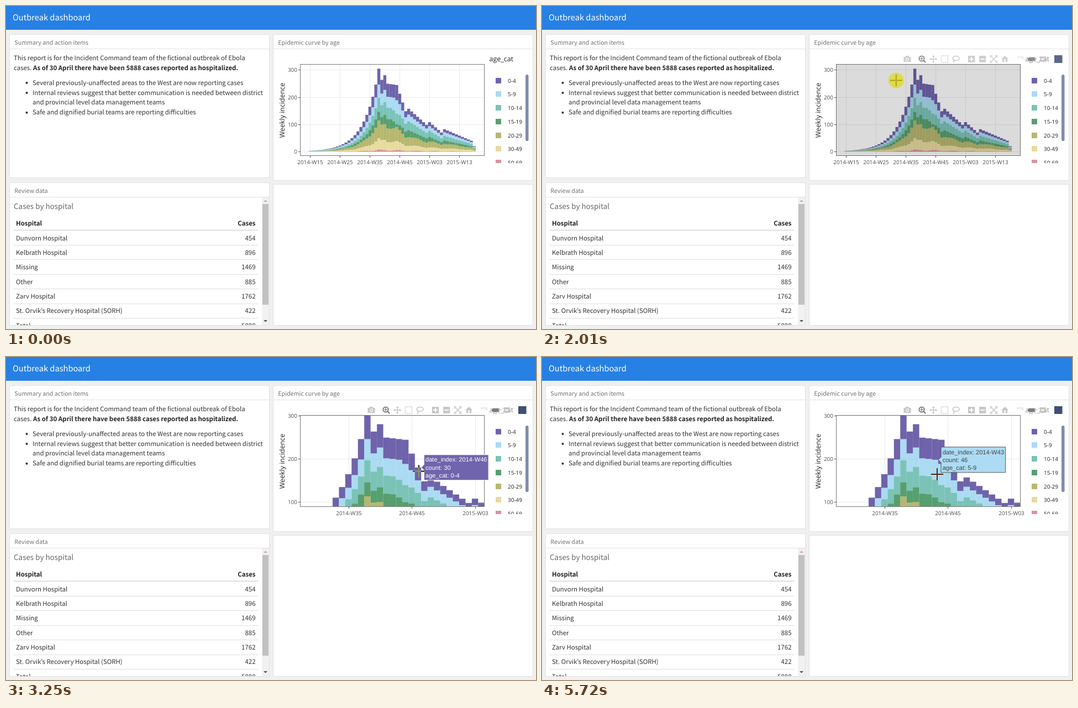
These frames come from a looping animation (959 by 584 pixels, 6960 ms). An HTML page with a canvas:

```html
<!DOCTYPE html>
<html lang="en">
<head>
<meta charset="utf-8">
<title>Outbreak dashboard</title>
<style>
html, body { margin: 0; width: 100%; height: 100%; overflow: hidden; background: #f0f0f0; }
canvas { display: block; width: 959px; height: 584px; }
</style>
</head>
<body>
<canvas id="stage" width="959" height="584"></canvas>
<script>
const ctx = document.getElementById('stage').getContext('2d');
const LOOP = 6960, ENTER = 310, PRESS = 2010, RELEASE = 2940, ZOOM = 3010;
const UI = '"Noto Sans CJK JP", "Noto Sans CJK SC", "Noto Sans CJK", "Open Sans", sans-serif';
const PLOT = '"Open Sans", "Noto Sans", sans-serif';
const TIP = '"Liberation Sans", Arial, sans-serif';
const BODY = 11.44;
const BOX = { x: 532.5, y: 105.5, w: 333, h: 165 };

const clamp = v => Math.max(0, Math.min(1, v));
const lerp = (a, b, u) => a + (b - a) * u;

// Weekly cases: exponential growth up to the peak, then a decline through key points
const FIRST = 15, PEAK = 38, LAST = 70;
const decline = [[PEAK, 304], [39, 263], [40, 280], [41, 249], [44, 244], [47, 148], [48, 157],
  [54, 98], [55, 108], [59, 70], [60, 82], [69, 40], [LAST, 20]];

function cases(week) {
  if (week < PEAK) return 300 * Math.exp(0.2 * (week - PEAK));
  const n = Math.max(1, decline.findIndex(p => p[0] >= week));
  const [a, b] = [decline[n - 1], decline[n]];
  return lerp(a[1], b[1], (week - a[0]) / (b[0] - a[0]));
}

// Each band: share of cases in it and all older bands, late shift, dip around week 44
const bands = [
  { age: '0-4', rgb: [51, 34, 136], share: 1 },
  { age: '5-9', rgb: [136, 204, 238], share: 0.807, late: 0.055, dip: 0.037, narrow: 3 },
  { age: '10-14', rgb: [68, 170, 153], share: 0.648, late: 0.06, dip: 0.076, narrow: 0.9 },
  { age: '15-19', rgb: [17, 119, 51], share: 0.48, late: 0.02, dip: 0.07, narrow: 0.9 },
  { age: '20-29', rgb: [153, 153, 51], share: 0.355, noise: 0.06 },
  { age: '30-49', rgb: [221, 204, 119], share: 0.15, noise: 0.1 },
  { age: '50-69', rgb: [204, 102, 119], share: 0.02, noise: 0.4 },
  { age: '70+', rgb: [136, 34, 85], share: 0.005 }
];
for (const b of bands) {
  b.fill = `rgba(${b.rgb},0.7)`;
  b.solid = `rgb(${b.rgb.map(n => Math.round(n * 0.7 + 76.5))})`;
}

function edge(week, { share, late = 0, dip = 0, narrow = 1, noise = 0 }) {
  const s = share + late * clamp((week - 44) / 4) - dip * Math.exp(-narrow * (week - 44) ** 2);
  return cases(week) * s * (1 + noise * Math.sin(week * 7.3));
}

const bars = Array.from({ length: LAST - FIRST + 1 }, (_, n) => {
  const week = FIRST + n;
  return { week, tops: [...bands.map(b => edge(week, b)), 0] };
});

const views = {
  full: { x: w => 550.4 + (w - 15) * 5.4, y: v => 263.3 - v * 0.4935, step: 5.4, firstWeek: 15, low: 0 },
  zoom: { x: w => 619.6 + (w - 35) * 11.45, y: v => 105.8 + (300 - v) * 0.783, step: 11.45, firstWeek: 35, low: 100 }
};
const weekName = w => w > 52 ? '2015-W' + String(w - 52).padStart(2, '0') : '2014-W' + w;

// Pointer strokes: start, end, and where they lead; advanced in steps of about 75 ms
const STEP = 75, ORIGIN = [775, 262];
const strokes = [
  [ENTER, 920, 712, 181], [1230, 1390, 696, 143], [1469, 1860, 617, 115],
  [PRESS, 2235, 712, 193], [2311, 2690, 775, 218], [RELEASE, 3630, 719, 195],
  [3720, 3790, 717, 225], [3860, 3860, 716, 184], [4570, 4570, 716, 185.5],
  [4640, 4870, 713, 232], [5040, 5040, 713, 236], [5490, 5720, 715, 212]
];

// Position now, position one step before, and the time of the current step
function pointer(t) {
  let at = ORIGIN, last = ORIGIN, time = 0;
  for (const [a, b, x, y] of strokes) {
    if (t < a - 8) break;
    const steps = Math.round((b - a) / STEP) + 1;
    const dt = (b - a) / (steps - 1) || 1;
    const k = Math.min(steps, Math.floor((t - a + 8) / dt) + 1);
    const from = at;
    const spot = n => [lerp(from[0], x, n / steps), lerp(from[1], y, n / steps)];
    last = spot(k - 1);
    at = spot(k);
    time = a + (k - 1) * dt;
  }
  if (t > time + 80) last = at;
  return { at, last, time };
}

function rect(x, y, w, h, fill) {
  ctx.fillStyle = fill;
  ctx.fillRect(x, y, w, h);
}

function text(s, x, y, size, { font = UI, weight = 400, fill = '#333', align = 'left' } = {}) {
  ctx.font = `${weight} ${size}px ${font}`;
  ctx.textAlign = align;
  ctx.fillStyle = fill;
  ctx.fillText(s, x, y);
  return ctx.measureText(s).width;
}

function stroke(color, width, ...lines) {
  ctx.strokeStyle = color;
  ctx.lineWidth = width;
  ctx.beginPath();
  for (const [x, y, ...rest] of lines) {
    ctx.moveTo(x, y);
    for (let n = 0; n < rest.length; n += 2) ctx.lineTo(rest[n], rest[n + 1]);
  }
  ctx.stroke();
}

function poly(points, fill) {
  ctx.fillStyle = fill;
  ctx.beginPath();
  for (let n = 0; n < points.length; n += 2) ctx.lineTo(points[n], points[n + 1]);
  ctx.closePath();
  ctx.fill();
}

function outline(color, width) {
  ctx.strokeStyle = color;
  ctx.lineWidth = width;
  ctx.stroke();
}

function oval(x, y, rx, ry = rx) {
  ctx.beginPath();
  ctx.ellipse(x, y, rx, ry, 0, 0, 7);
}

function disc(x, y, r, fill) {
  ctx.fillStyle = fill;
  oval(x, y, r);
  ctx.fill();
}

function clipped(x, y, w, h, draw) {
  ctx.save();
  ctx.beginPath();
  ctx.rect(x, y, w, h);
  ctx.clip();
  draw();
  ctx.restore();
}

function card(x, y, w, h, title) {
  rect(x, y, w, h, '#fff');
  ctx.strokeStyle = '#e2e2e2';
  ctx.lineWidth = 1;
  ctx.strokeRect(x + 0.5, y + 0.5, w - 1, h - 1);
  if (!title) return;
  rect(x, y + 26, w, 1, '#e2e2e2');
  text(title, x + 9.3, y + 19, 10.68, { fill: '#707070' });
}

function summary() {
  text('This report is for the Incident Command team of the fictional outbreak of Ebola', 14, 97.6, BODY);
  const w = text('cases. ', 14, 115.6, BODY);
  text('As of 30 April there have been 5888 cases reported as hospitalized.', 14 + w, 115.6, BODY,
    { weight: 700, fill: '#222' });
  ['Several previously-unaffected areas to the West are now reporting cases',
    'Internal reviews suggest that better communication is needed between district',
    'and provincial level data management teams',
    'Safe and dignified burial teams are reporting difficulties'].forEach((s, n) => {
    const y = 142.6 + n * 17.9;
    text(s, 48, y, BODY);
    if (n !== 2) disc(37.5, y - 3.6, 2, '#333');
  });
}

function table() {
  text('Cases by hospital', 14, 367, 13.45, { weight: 300, fill: '#666' });
  const row = (a, b, y, opts) => {
    text(a, 18, y, BODY, opts);
    text(b, 451.5, y, BODY, { ...opts, align: 'right' });
  };
  row('Hospital', 'Cases', 396.6, { weight: 700, fill: '#222' });
  rect(14, 404.5, 442, 1.6, '#d8d8d8');
  Object.entries({
    'Dunvorn Hospital': 454, 'Kelbrath Hospital': 896, Missing: 1469, Other: 885,
    'Zarv Hospital': 1762, 'St. Orvik’s Recovery Hospital (SORH)': 422, Total: 5888
  }).forEach(([name, count], n) => {
    row(name, count, 423.6 + n * 26.35);
    rect(14, Math.round(432 + n * 26.4), 442, 1, '#dedede');
  });
  rect(463, 346, 13, 231, '#f1f1f1');
  rect(464, 358, 11, 182, '#c1c1c1');
  poly([466, 354, 469.5, 350.5, 473, 354], '#d3a5a8');
  poly([466, 568, 473, 568, 469.5, 571.5], '#505050');
}

function dashboard() {
  rect(0, 0, 959, 584, '#f0f0f0');
  rect(0, 0, 959, 43, '#2780e3');
  text('Outbreak dashboard', 12, 26.2, 14.65, { fill: '#fff' });
  card(6, 51, 471, 260, 'Summary and action items');
  card(6, 319, 471, 259, 'Review data');
  card(483, 51, 471, 265, 'Epidemic curve by age');
  card(483, 322, 471, 256);
  summary();
  clipped(7, 346, 469, 231, table);
}

function chart(view) {
  const { x, y, w, h } = BOX;
  const tick = { font: PLOT, fill: '#4d4d4d' };
  for (let v = view.low; v <= 300; v += 100) {
    const py = Math.round(view.y(v)) + 0.5;
    stroke('#ebebeb', 1, [x, py, x + w, py]);
    stroke('#444', 1, [x - 3.5, py, x, py]);
    text(v, 527, py + 3.6, 9.96, { ...tick, align: 'right' });
  }
  for (let v = view.firstWeek; view.x(v) < x + w; v += 10) {
    const px = Math.round(view.x(v)) + 0.5;
    stroke('#ebebeb', 1, [px, y, px, y + h]);
    stroke('#444', 1, [px, y + h, px, y + h + 3.5]);
    text(weekName(v), px, 286.2, 9.96, { ...tick, align: 'center' });
  }
  clipped(x, y, w, h, () => {
    for (const { week, tops } of bars) {
      const left = view.x(week) - view.step / 2;
      bands.forEach((band, k) => {
        const top = view.y(tops[k]);
        rect(left, top, view.step, view.y(tops[k + 1]) - top, band.fill);
      });
    }
  });
  ctx.strokeStyle = '#777';
  ctx.lineWidth = 1;
  ctx.strokeRect(x, y, w, h);
  ctx.save();
  ctx.translate(504, 188.5);
  ctx.rotate(-Math.PI / 2);
  text('Weekly incidence', 0, 0, 12.44, { font: PLOT, fill: '#222', align: 'center' });
  ctx.restore();
}

function legend() {
  text('age_cat', 874.5, 100, 12.44, { font: PLOT, fill: '#222' });
  clipped(870, 105, 84, 179, () => bands.slice(0, 7).forEach((band, k) => {
    const y = 134.7 + k * 24.75;
    rect(886, Math.round(y - 5), 10, 10, band.fill);
    text(band.age, 908, y + 4, 9.96, { font: PLOT, fill: '#222' });
  }));
  ctx.fillStyle = '#808bb0';
  ctx.beginPath();
  ctx.roundRect(940, 124, 5.5, 120, 2.6);
  ctx.fill();
}

// Toolbar icons, each drawn around its own centre
const icons = {
  camera(c) { rect(-6.5, -4, 13, 9, c); rect(-3, -6, 6, 2, c); disc(0, 0.5, 3, '#fff'); disc(0, 0.5, 1.8, c); },
  lens(c) {
    oval(-1, -1, 4.6);
    outline(c, 2);
    stroke(c, 2.2, [2.4, 2.4, 6.3, 6.3]);
    stroke(c, 1.3, [-3.4, -1, 1.4, -1], [-1, -3.4, -1, 1.4]);
  },
  pan(c) {
    stroke(c, 1.4, [-6, 0, 6, 0], [0, -6, 0, 6]);
    for (const s of [-1, 1]) {
      poly([s * 7, 0, s * 4, -2.5, s * 4, 2.5], c);
      poly([0, s * 7, -2.5, s * 4, 2.5, s * 4], c);
    }
  },
  select(c) {
    ctx.setLineDash([2, 1.4]);
    stroke(c, 1.6, [-6, -6, 6, -6, 6, 6, -6, 6, -6, -6]);
    ctx.setLineDash([]);
  },
  lasso(c) {
    oval(0.5, -1.5, 6, 4);
    outline(c, 1.6);
    stroke(c, 1.6, [-4, 1.5, -2.5, 4, -4, 6.5]);
  },
  plus(c) { icons.minus(c); stroke('#fff', 2, [0, -4, 0, 4]); },
  minus(c) { rect(-6, -6, 12, 12, c); stroke('#fff', 2, [-4, 0, 4, 0]); },
  fit(c) {
    stroke(c, 1.5, [-4.5, -4.5, 4.5, 4.5], [-4.5, 4.5, 4.5, -4.5]);
    for (const a of [-1, 1]) for (const b of [-1, 1]) stroke(c, 1.5, [a * 2.5, b * 6, a * 6, b * 6, a * 6, b * 2.5]);
  },
  home(c) { poly([-6.5, 0, 0, -6, 6.5, 0], c); rect(-4.5, 0, 3.3, 5.5, c); rect(1.2, 0, 3.3, 5.5, c); },
  spikes(c) { for (let n = 0; n < 4; n++) rect(-5 + n * 3, -4.5, 1.7, 1.7, c); rect(4, -1.5, 1.7, 1.7, c); },
  tag(c) { poly([-7, 0, -4, -3.3, 6.5, -3.3, 6.5, 3.3, -4, 3.3], c); },
  tags(c) { for (const y of [-3, 3]) poly([-6.5, y, -4, y - 2, 6.5, y - 2, 6.5, y + 2, -4, y + 2], c); }
};
// Icons sit 20 px apart within a group
const groups = [[661, 'camera'], [688, 'lens', 'pan', 'select', 'lasso'],
  [777, 'plus', 'minus', 'fit', 'home'], [865, 'spikes', 'tag', 'tags']];

function toolbar(opacity) {
  if (opacity <= 0) return;
  ctx.save();
  ctx.globalAlpha = opacity;
  rect(653, 88, 291, 16, 'rgba(255,255,255,0.5)');
  for (const [x, ...names] of groups) names.forEach((name, n) => {
    ctx.save();
    ctx.translate(x + n * 20.2, 96);
    icons[name](name === 'lens' || name === 'tag' ? '#7c7c7c' : '#c6c6c6');
    ctx.restore();
  });
  rect(927, 89, 14.5, 14, '#3f4f75');
  ctx.restore();
}

function tooltip(view, [x, y]) {
  const bar = bars.find(b => Math.abs(view.x(b.week) - x) <= view.step / 2);
  if (!bar) return;
  const k = bands.findIndex((_, n) => y >= view.y(bar.tops[n]) && y < view.y(bar.tops[n + 1]));
  if (k < 0) return;
  const lines = ['date_index: ' + weekName(bar.week),
    'count: ' + Math.round(bar.tops[k] - bar.tops[k + 1]), 'age_cat: ' + bands[k].age];
  ctx.font = `11.08px ${TIP}`;
  const w = Math.max(...lines.map(s => ctx.measureText(s).width)) + 5.2;
  const tx = view.x(bar.week) + view.step / 2, ty = view.y(bar.tops[k]);
  const l = tx + 5.1, r = l + w, a = ty - 23, b = ty + 23;
  const ink = k ? '#444' : '#fff';
  poly([tx, ty, l, ty + 5.1, l, b, r, b, r, a, l, a, l, ty - 5.1], bands[k].solid);
  outline(ink, 0.9);
  lines.forEach((s, n) => text(s, l + 2.6, ty - 10.3 + n * 14.4, 11.08, { font: TIP, fill: ink }));
}

function selection([x, y], dim) {
  const x0 = 617, y0 = 115, { x: l, y: t, w, h } = BOX;
  ctx.fillStyle = `rgba(0,0,0,${0.4 * dim})`;
  ctx.beginPath();
  ctx.rect(l, t, w, h);
  ctx.rect(x0, y0, x - x0, y - y0);
  ctx.fill('evenodd');
  const len = Math.min(8.5, (x - x0) / 2, (y - y0) / 2);
  if (len < 2) return;
  for (const [cx, sx] of [[x0, 1], [x, -1]]) for (const [cy, sy] of [[y0, 1], [y, -1]]) {
    const p = (a, b) => [cx + sx * a, cy + sy * b];
    poly([...p(-3, len), ...p(-0.4, len), ...p(-0.4, -0.4), ...p(len, -0.4), ...p(len, -3), ...p(-3, -3)], '#fff');
    outline('#444', 0.85);
  }
}

// Inverts whatever lies below it
function crosshair(x, y) {
  ctx.globalCompositeOperation = 'difference';
  rect(x - 1, y - 11, 2, 22, '#fff');
  rect(x - 11, y - 1, 10, 2, '#fff');
  rect(x + 1, y - 1, 10, 2, '#fff');
  ctx.globalCompositeOperation = 'source-over';
}

function draw(t) {
  const { at, last, time } = pointer(t);
  const view = t < ZOOM ? views.full : views.zoom;
  const dragging = time >= PRESS && t < ZOOM;
  const fade = since => clamp((time - since) / 300);
  dashboard();
  chart(view);
  legend();
  toolbar(fade(ENTER) - fade(PRESS - 45) + fade(RELEASE));
  if (time < ENTER) return;
  if (dragging) selection(last, clamp((time - PRESS + 70) / 200));
  else tooltip(view, at);
  crosshair(...at);
  if (dragging && time < RELEASE) disc(...at, 14, 'rgba(226,218,20,0.7)');
}

ctx.textRendering = 'geometricPrecision';
const start = performance.now();
function frame() {
  draw((performance.now() - start) % LOOP);
  requestAnimationFrame(frame);
}
frame();
</script>
</body>
</html>
```
